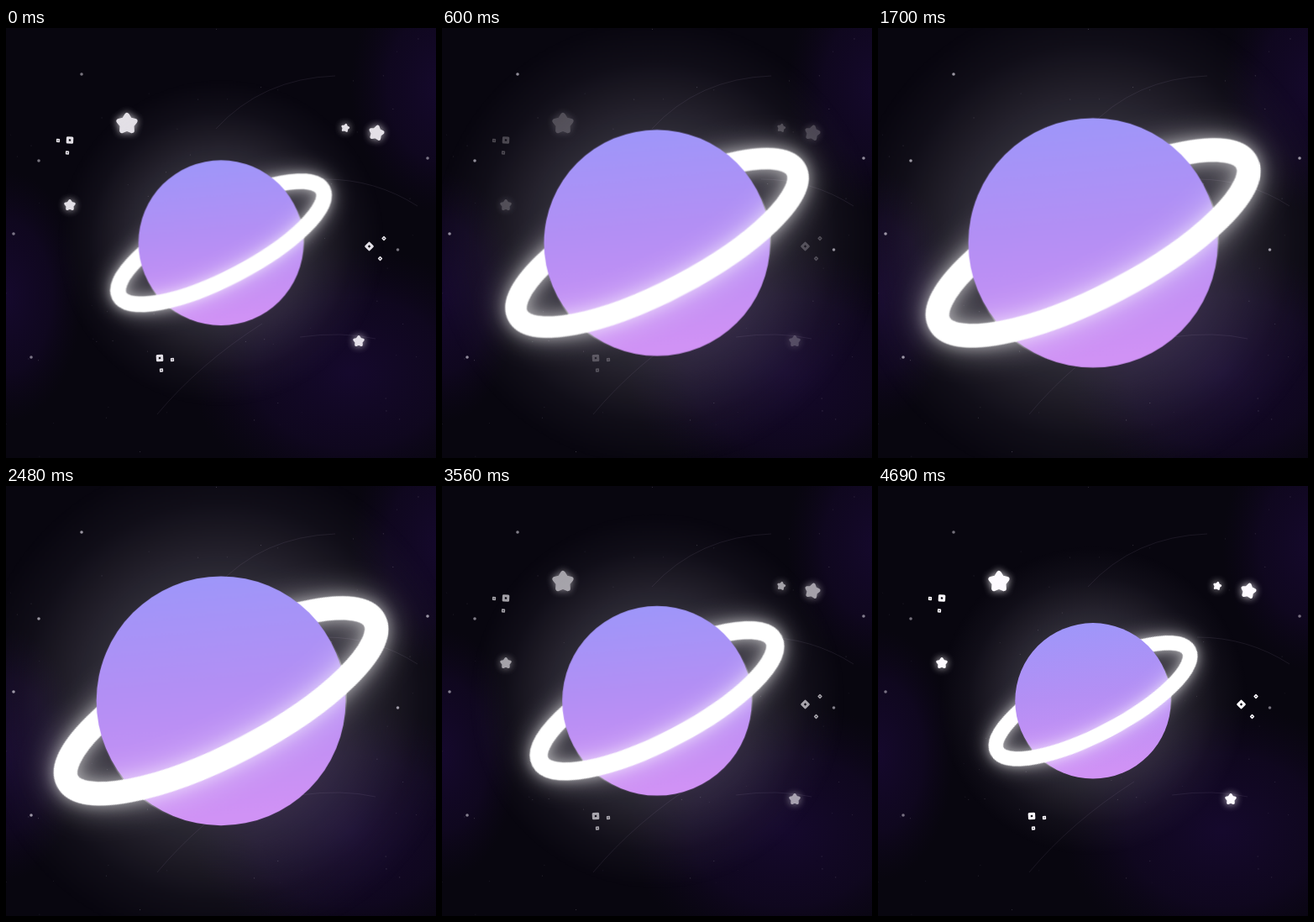
Animation of 512 by 512 pixels, one loop 4.72 s. Source, as an HTML page:

```html
<!DOCTYPE html>
<html lang="en">
<head>
<meta charset="utf-8">
<title>Breathing planet</title>
<style>
  html, body { margin: 0; width: 100%; height: 100%; overflow: hidden; background: #08060f; }
  svg { display: block; width: 100%; height: 100%; }
</style>
</head>
<body>
<svg viewBox="0 0 512 512">
  <defs>
    <linearGradient id="skin" x1="0" y1="0" x2="0.1" y2="1">
      <stop offset="0" stop-color="#9c97fa"/>
      <stop offset="0.5" stop-color="#b48ff4"/>
      <stop offset="1" stop-color="#d092f5"/>
    </linearGradient>
    <radialGradient id="halo">
      <stop offset="0.48" stop-color="#efe6ff" stop-opacity="0.17"/>
      <stop offset="0.62" stop-color="#efe6ff" stop-opacity="0.11"/>
      <stop offset="0.8" stop-color="#efe6ff" stop-opacity="0.04"/>
      <stop offset="1" stop-color="#efe6ff" stop-opacity="0"/>
    </radialGradient>
    <radialGradient id="mist">
      <stop offset="0" stop-color="#1e0b40" stop-opacity="0.6"/>
      <stop offset="0.6" stop-color="#1a0936" stop-opacity="0.4"/>
      <stop offset="1" stop-color="#140628" stop-opacity="0"/>
    </radialGradient>
    <filter id="ringGlow" filterUnits="userSpaceOnUse" x="-220" y="-220" width="440" height="440">
      <feGaussianBlur in="SourceGraphic" stdDeviation="5.5" result="near"/>
      <feGaussianBlur in="SourceGraphic" stdDeviation="13" result="far"/>
      <feComponentTransfer in="near" result="nearSoft"><feFuncA type="linear" slope="0.45"/></feComponentTransfer>
      <feComponentTransfer in="far" result="farSoft"><feFuncA type="linear" slope="0.55"/></feComponentTransfer>
      <feMerge>
        <feMergeNode in="farSoft"/><feMergeNode in="nearSoft"/><feMergeNode in="SourceGraphic"/>
      </feMerge>
    </filter>
    <filter id="starGlow" x="-150%" y="-150%" width="400%" height="400%">
      <feGaussianBlur stdDeviation="5" result="blur"/>
      <feComponentTransfer in="blur" result="soft"><feFuncA type="linear" slope="0.9"/></feComponentTransfer>
      <feMerge><feMergeNode in="soft"/><feMergeNode in="SourceGraphic"/></feMerge>
    </filter>
    <!-- Slightly wider than the planet, so no seam shows across the ring -->
    <clipPath id="disc"><circle r="101"/></clipPath>
  </defs>

  <rect width="512" height="512" fill="#08060f"/>
  <g fill="url(#mist)">
    <ellipse cx="520" cy="70" rx="110" ry="150"/>
    <ellipse cx="410" cy="410" rx="190" ry="150"/>
    <ellipse cx="0" cy="320" rx="90" ry="150"/>
  </g>
  <g fill="none" stroke="#a89cc0" stroke-opacity="0.11">
    <path d="M250 120Q305 60 392 57"/>
    <path d="M180 460Q230 400 305 352"/>
    <path d="M380 180Q440 180 490 212"/>
    <path d="M350 368Q400 361 440 370"/>
  </g>
  <g id="dust" fill="#d8d4e0"></g>
  <g id="stars" fill="#fdfaff" stroke="#fdfaff" stroke-linejoin="round"></g>
  <g id="planet">
    <circle r="200" fill="url(#halo)"/>
    <g fill="none" stroke="#fff" stroke-width="19">
      <ellipse rx="139" ry="42.2" transform="rotate(-27.6)" filter="url(#ringGlow)"/>
      <circle r="100" fill="url(#skin)" stroke="none"/>
      <g clip-path="url(#disc)">
        <path d="M-139 0A139 42.2 0 0 0 139 0" transform="rotate(-27.6)" filter="url(#ringGlow)"/>
      </g>
    </g>
  </g>
</svg>
<script>
const LOOP = 4720;
const SMALL = 92.7, LARGE = 148.5;
const GROW = { start: -204, length: 1332 };
const SHRINK = { start: 2440, length: 2160 };
const byId = id => document.getElementById(id);
const dust = byId('dust'), stars = byId('stars'), planet = byId('planet');

function add(parent, tag, attrs) {
  const el = document.createElementNS('http://www.w3.org/2000/svg', tag);
  for (const key in attrs) el.setAttribute(key, attrs[key]);
  parent.append(el);
}

function addStar(x, y, size, turn = 0) {
  const points = Array.from({ length: 10 }, (_, i) => {
    const r = size * (i % 2 ? 0.45 : 0.78);
    const a = (i * 36 + turn - 90) * Math.PI / 180;
    return `${r * Math.cos(a)},${r * Math.sin(a)}`;
  });
  add(stars, 'polygon', { points: points.join(' '), transform: `translate(${x} ${y})`,
    'stroke-width': size * 0.45, filter: 'url(#starGlow)' });
}

// Small square frame with a dark middle
function addSparkle(x, y, size, turn) {
  const line = size * 0.36, side = size - line;
  add(stars, 'rect', { x: -side / 2, y: -side / 2, width: side, height: side, fill: 'none',
    'stroke-width': line, transform: `translate(${x} ${y}) rotate(${turn})` });
}

// One large sparkle with a small one beside it and a small one below
function addCluster(x, y, turn, beside, below) {
  addSparkle(x, y, 8.4, turn);
  addSparkle(x + beside[0], y + beside[1], 4.2, turn);
  addSparkle(x + below[0], y + below[1], 4.2, turn);
}

function addDot(x, y, r, opacity) {
  add(dust, 'circle', { cx: x, cy: y, r, opacity });
}

addStar(144, 114, 13);
addStar(441, 125, 9.5, 12);
addStar(404, 119, 5.2, 12);
addStar(76, 211, 7);
addStar(420, 373, 7);
addCluster(76, 133.5, 3, [-14, 0.5], [-3, 15]);
addCluster(183, 393, -3, [15, 2], [2, 14.5]);
addCluster(432.5, 260, 45, [17.5, -9.5], [13, 14.5]);

for (const [x, y] of [[90, 55], [39, 158], [9, 245], [502, 155], [466.5, 264], [30, 392]])
  addDot(x, y, 1.8, 0.7);

let seed = 7;
const random = () => (seed = seed * 16807 % 2147483647) / 2147483647;
for (let i = 0; i < 70; i++) addDot(random() * 512, random() * 512, 0.6, 0.08 + random() * 0.2);

// Cubic ease from (0,0) to (1,1) with handles at (0.25,0) and (0.55,1)
function ease(x) {
  if (x <= 0) return 0;
  if (x >= 1) return 1;
  let low = 0, high = 1, s = 0.5;
  for (let i = 0; i < 24; i++) {
    s = (low + high) / 2;
    const at = 0.75 * (1 - s) ** 2 * s + 1.65 * (1 - s) * s * s + s ** 3;
    if (at < x) low = s; else high = s;
  }
  return s * s * (3 - 2 * s);
}

const progress = (t, phase) => ease((t - phase.start) / phase.length);

function render(time) {
  const t = time % LOOP;
  const grown = progress(t, GROW) - progress(t, SHRINK);
  const radius = SMALL + (LARGE - SMALL) * grown;
  planet.setAttribute('transform', `translate(256 255.8) scale(${radius / 100})`);
  stars.setAttribute('opacity', 1 - grown);
  dust.setAttribute('opacity', 0.75 + 0.25 * grown);
}

const begin = performance.now();
function tick() {
  render(performance.now() - begin);
  requestAnimationFrame(tick);
}
tick();
</script>
</body>
</html>
```
